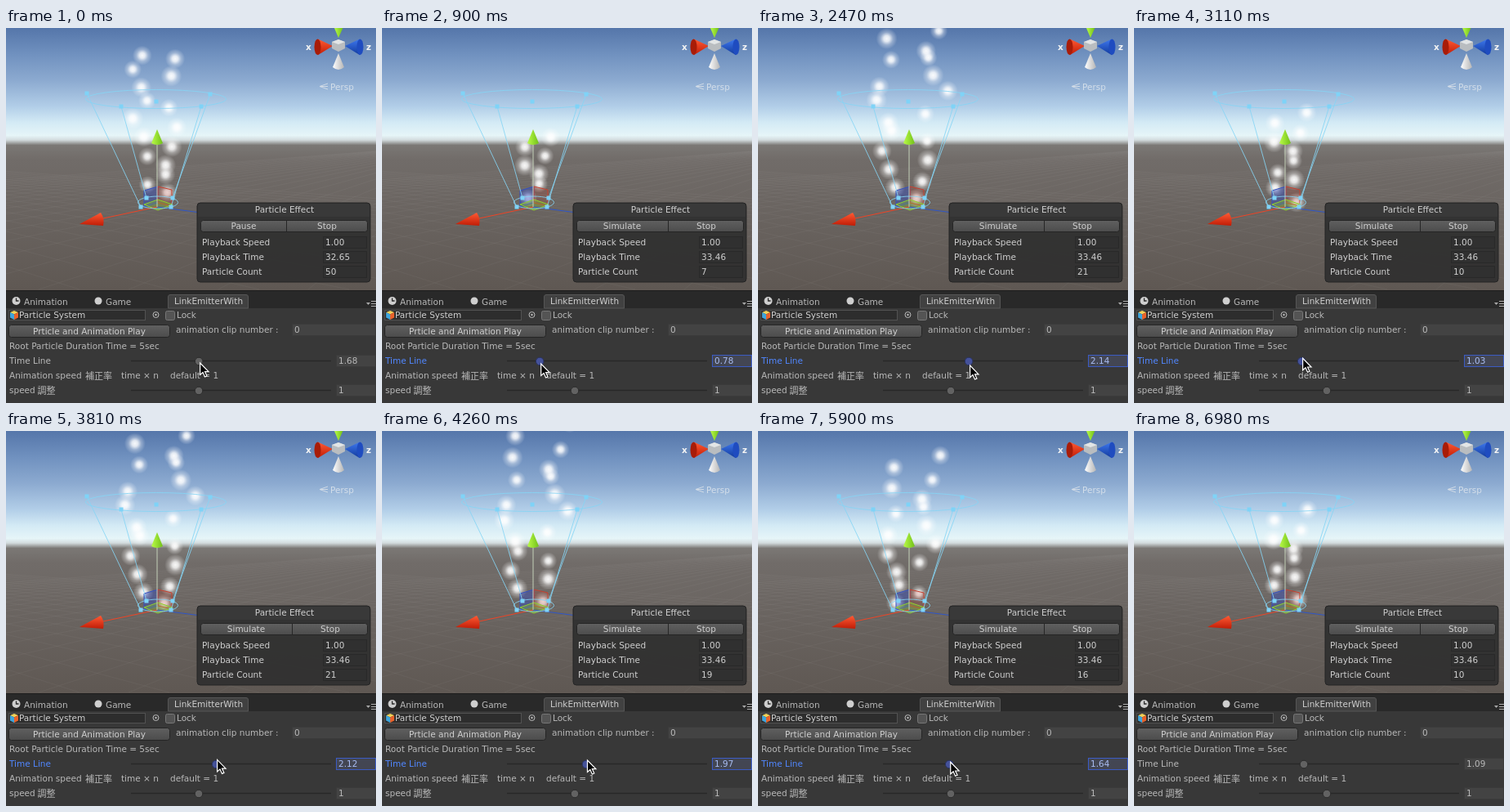
These frames come from a looping animation (453 by 459 pixels, 7080 ms). An HTML page:

```html
<!DOCTYPE html>
<html lang="en">
<head>
<meta charset="utf-8">
<title>Particle timeline</title>
<style>
html, body { margin: 0; width: 100%; height: 100%; overflow: hidden; background: #383838; }
svg { display: block; width: 100vw; height: 100vh; }
text { font: 10.5px "DejaVu Sans", "Noto Sans CJK JP", sans-serif; fill: #b9b9b9; white-space: pre; }
.mid { text-anchor: middle; }
.lit { fill: #cfcfcf; }
.cjk { font-family: "Noto Sans CJK JP", sans-serif; font-size: 11px; }
.axis { font-weight: bold; fill: #f4f4f4; }
.field { fill: #434343; stroke: #3b3b3b; }
.slot { fill: #2d2d2d; stroke: #525252; }
.stat { fill: #303030; stroke: #292929; }
.button { fill: url(#btn); stroke: #252525; }
.wire { fill: none; stroke: #86d5f5; stroke-width: .85; }
.groove { stroke: #282828; stroke-width: 1.5; }
.knob { fill: #626262; stroke: #2b2b2b; }
.on .label { fill: #5187ff; }
.on .knob { fill: #45529a; stroke: #28325e; }
.on .field { stroke: #3b5bc4; fill: #434653; }
.on .value { fill: #a9bdf2; }
</style>
</head>
<body>
<svg viewBox="0 0 453 459" preserveAspectRatio="none">
  <defs>
    <linearGradient id="sky" x2="0" y2="1">
      <stop offset="0" stop-color="#5576aa"/>
      <stop offset=".1" stop-color="#7091bf"/>
      <stop offset=".2" stop-color="#8caad0"/>
      <stop offset=".3" stop-color="#b2cee8"/>
      <stop offset=".36" stop-color="#d3eaf5"/>
      <stop offset=".41" stop-color="#e6f5f8"/>
      <stop offset=".427" stop-color="#d3dcde"/>
      <stop offset=".447" stop-color="#7b7875"/>
      <stop offset=".5" stop-color="#716c69"/>
      <stop offset="1" stop-color="#5f5853"/>
    </linearGradient>
    <linearGradient id="btn" x2="0" y2="1">
      <stop offset="0" stop-color="#606060"/><stop offset="1" stop-color="#4c4c4c"/>
    </linearGradient>
    <linearGradient id="red" x2="0" y2="1">
      <stop offset="0" stop-color="#ff5a34"/><stop offset="1" stop-color="#c01c06"/>
    </linearGradient>
    <linearGradient id="blue" x2="0" y2="1">
      <stop offset="0" stop-color="#3e78ee"/><stop offset="1" stop-color="#123a9c"/>
    </linearGradient>
    <linearGradient id="green">
      <stop offset="0" stop-color="#b9fb48"/><stop offset="1" stop-color="#72c01a"/>
    </linearGradient>
    <linearGradient id="grey">
      <stop offset="0" stop-color="#ffffff"/><stop offset="1" stop-color="#b5b5b5"/>
    </linearGradient>
    <radialGradient id="glow">
      <stop offset="0" stop-color="#fff" stop-opacity=".95"/>
      <stop offset=".28" stop-color="#fff" stop-opacity=".82"/>
      <stop offset=".6" stop-color="#fff" stop-opacity=".32"/>
      <stop offset="1" stop-color="#fff" stop-opacity="0"/>
    </radialGradient>
    <clipPath id="view"><rect width="453" height="321"/></clipPath>
  </defs>

  <g clip-path="url(#view)">
    <rect width="453" height="321" fill="url(#sky)"/>
    <path id="grid" stroke="#ddd" stroke-opacity=".045" fill="none"/>
    <g id="sparks" fill="url(#glow)"></g>

    <!-- move handles -->
    <path d="M169 199L186 194V214L169 219Z" fill="#2d49c8" fill-opacity=".4" stroke="#3450c0"/>
    <path d="M186 194L203 198V218L186 214Z" fill="#c03a2c" fill-opacity=".2" stroke="#c8402f"/>
    <path d="M169 216L186 210L204 216L186 223Z" fill="#8ac42a" fill-opacity=".3" stroke="#8fd22c"/>
    <path d="M185 219L119 233" stroke="#ee4426"/>
    <path d="M185 219L246 227" stroke="#2f56c8"/>
    <path d="M185 219V142" stroke="#c3d0b8"/>
    <path d="M90 240L116 226Q121 233 119 242Z" fill="url(#red)"/>
    <path d="M185 124L192 141Q185 145 178 141Z" fill="url(#green)"/>

    <!-- emitter cone -->
    <g class="wire" id="cone">
      <ellipse cx="183.5" cy="87" rx="86" ry="11.5"/>
      <ellipse cx="186" cy="213.5" rx="24.5" ry="7.5"/>
    </g>
    <g id="dots" fill="#7fd3f7"><rect x="181.500" y="87.500" width="5" height="5"/></g>

    <!-- orientation gizmo -->
    <path d="M402 0H412.500L407 12Z" fill="url(#green)"/>
    <path d="M400 22L382 13.500V33Z" fill="url(#red)"/>
    <ellipse cx="381.500" cy="23.200" rx="4" ry="9.800" fill="#a81c08"/>
    <path d="M415 22L433 13.500V33Z" fill="url(#blue)"/>
    <ellipse cx="433.500" cy="23.200" rx="4" ry="9.800" fill="#1f4cc0"/>
    <path d="M399 17L407 14L415 17V25L407 29L399 25Z" fill="#b9bdc0"/>
    <path d="M399 17L407 14L415 17L407 20Z" fill="#e2e5e6"/>
    <path d="M407 31L414 48Q407 54 400 48Z" fill="url(#grey)"/>
    <text class="axis" x="367" y="27">x</text>
    <text class="axis" x="441" y="27">z</text>
    <g opacity=".8">
      <path d="M394 68L384 71.500L394 75M384 71.500H394" fill="none" stroke="#dfe5ea"/>
      <text x="397" y="76" style="fill:#e3e9ef">Persp</text>
    </g>

    <!-- effect box -->
    <rect x="234" y="214" width="212" height="97" rx="4" fill="#303030" fill-opacity=".94" stroke="#252525"/>
    <path d="M235 231V218Q235 215 238 215H442Q445 215 445 218V231Z" fill="#393939"/>
    <text class="mid lit" x="341" y="226">Particle Effect</text>
    <rect class="button" x="238.500" y="235.500" width="204" height="14" rx="3"/>
    <path id="split" stroke="#262626"/>
    <text class="mid lit" id="mode" y="246"></text>
    <text class="mid lit" id="stop" y="246">Stop</text>
    <g id="stats"></g>
  </g>

  <!-- editor tabs -->
  <rect y="321" width="453" height="138" fill="#383838"/>
  <rect y="321" width="453" height="22" fill="#292929"/>
  <path d="M0 321.500H453" stroke="#1c1c1c"/>
  <path d="M198.500 343V329Q198.500 326.500 201 326.500H294Q296.500 326.500 296.500 329V343Z" fill="#414141" stroke="#565656"/>
  <circle cx="12.500" cy="334" r="5" fill="#cfcfcf"/>
  <path d="M12.500 330.500V334H15.500" fill="none" stroke="#292929" stroke-width="1.300"/>
  <circle cx="113" cy="334" r="4.500" fill="#cfcfcf"/>
  <text x="22" y="339">Animation</text>
  <text x="122" y="339">Game</text>
  <text class="mid lit" x="248" y="338">LinkEmitterWith</text>
  <path d="M441 336H446L443.500 339Z" fill="#aaa"/>
  <path d="M447 334.500H453M447 337.500H453M447 340.500H453" stroke="#aaa"/>

  <!-- inspector rows -->
  <rect class="slot" x="3.500" y="345.500" width="167" height="12"/>
  <path d="M5 348L10 346L15 348L10 350.500Z" fill="#f2d25a"/>
  <path d="M5 348L10 350.500V357L5 354.500Z" fill="#3fa5dc"/>
  <path d="M15 348L10 350.500V357L15 354.500Z" fill="#e8622b"/>
  <text class="lit" x="16" y="355">Particle System</text>
  <circle cx="183.500" cy="351" r="3.500" fill="none" stroke="#bbb"/>
  <circle cx="183.500" cy="351" r="1.200" fill="#bbb"/>
  <rect x="195.500" y="346.500" width="11" height="11" rx="2" fill="#545454" stroke="#777"/>
  <text x="209" y="355">Lock</text>
  <rect class="button" x="3.500" y="363.500" width="197" height="15" rx="3"/>
  <text class="mid lit" x="102" y="375">Prticle and Animation Play</text>
  <text x="208" y="373">animation clip number :</text>
  <rect class="field" x="350.500" y="362.500" width="102" height="14"/>
  <text x="353" y="373">0</text>
  <text x="4" y="393">Root Particle Duration Time = 5sec</text>

  <g id="timeline">
    <text class="label" x="4" y="411">Time Line</text>
    <path class="groove" d="M153 407.500H398"/>
    <circle class="knob" id="knob" cy="408" r="4.800"/>
    <rect class="field" x="404.500" y="400.500" width="48" height="14"/>
    <text class="value" id="value" x="407" y="411"></text>
  </g>

  <text x="4" y="429">Animation speed</text>
  <text class="cjk" x="97" y="429.500">補正率</text>
  <text x="141" y="429">time × n</text>
  <text x="201" y="429">default = 1</text>
  <text x="4" y="447">speed</text>
  <text class="cjk" x="38.500" y="447.500">調整</text>
  <path class="groove" d="M153 443.500H398"/>
  <circle class="knob" cx="236" cy="444" r="4.800"/>
  <rect class="field" x="404.500" y="436.500" width="48" height="14"/>
  <text x="407" y="447">1</text>

  <path id="cursor" d="M0 0V14.500L3.400 11.500L5.900 17L8.300 16L5.900 10.700H10.400Z" fill="#000" stroke="#fff" stroke-width="1.200"/>
</svg>

<script>
const LOOP = 7080, GRAB = 200, RELEASE = 6980, STEP = 58;
const START = { value: 1.68, y: 410 };
const LEAVE = { from: 6250, to: 6720, dx: 194, dy: 57 };

// Slider drags: each bends from the last value past `via` to `value`
const drags = [
  { from: GRAB, to: 900, via: 1.23, value: .78, y: 411 },
  { from: 1020, to: 1720, via: 2.27, value: 3.75, y: 419 },
  { from: 1840, to: 2530, via: 2.65, value: 1.9, y: 412 },
  { from: 2590, to: 3270, via: 1.03, value: .95, y: 402 },
  { from: 3570, to: 4260, via: 3.1, value: 1.97, y: 403 },
  { from: 4320, to: 4840, via: 1.2, value: .65, y: 403 },
  { from: 5330, to: 6020, via: 2.7, value: 1.09, y: 406 }
];

const $ = id => document.getElementById(id);
const mix = (a, b, f) => a + (b - a) * f;

function add(parent, tag, attrs, text = "") {
  const el = document.createElementNS("http://www.w3.org/2000/svg", tag);
  for (const name in attrs) el.setAttribute(name, attrs[name]);
  el.textContent = text;
  return parent.appendChild(el);
}

function random(n) {
  const s = Math.sin(n * 12.9898) * 43758.5453;
  return s - Math.floor(s);
}

// Part of a move done at time t, in whole screen updates
function progress({ from, to }, t) {
  if (t < from) return 0;
  const n = Math.round((to - from) / STEP) + 1;
  const step = (to - from) / (n - 1);
  return Math.min(n, Math.floor((t - from) / step + .001) + 1) / n;
}

function slider(t) {
  let { value, y } = START;
  for (const d of drags) {
    const f = progress(d, t);
    value = mix(mix(value, d.via, f), mix(d.via, d.value, f), f);
    y = mix(y, d.y, f);
  }
  return { value: Math.round(value * 100) / 100, y };
}

// Sparks leave on alternating sides and spread along the cone as they rise
function sparkAt(n, age) {
  const swing = Math.cbrt(Math.cos(Math.PI * 7 / 8 * (n - 5.5)));
  const reach = (.25 + .015 * (n % 36)) * (.6 + .8 * random(n));
  const depth = 2 * random(n + .5) - 1;
  return [185 + swing * reach * (24 + 55 * age), 214 + 5 * depth - age * (118 + 8 * depth)];
}

const sparks = Array.from({ length: 40 }, (_, i) =>
  add($("sparks"), "circle", { r: 10.5 + 3 * random(i + .25) }));

// Cone edges, each from the top rim to the base
for (const [x1, y1, x2, y2] of [[99, 80, 165, 219], [141, 96, 172, 208],
  [239, 96, 202, 219], [250, 81, 204, 208]]) {
  add($("cone"), "line", { x1, y1, x2, y2 });
  for (const [x, y] of [[x1, y1], [x2, y2]])
    add($("dots"), "rect", { x: x - 2.5, y: y - 2.5, width: 5, height: 5 });
}

const stats = ["Playback Speed", "Playback Time", "Particle Count"].map((name, i) => {
  const y = 266 + i * 18;
  add($("stats"), "text", { x: 240, y, class: "lit" }, name);
  add($("stats"), "rect", { x: 388.5, y: y - 10.5, width: 53, height: 14, class: "stat" });
  return add($("stats"), "text", { x: 391, y, class: "lit" });
});

let grid = "";
for (let i = -10; i < 14; i++)
  grid += `M590 140L${-290 - 110 * i} 320M-476 140L${530 + 110 * i} 320`;
$("grid").setAttribute("d", grid);

function draw(t) {
  const { value, y } = slider(t);
  const held = t >= GRAB;
  const knobX = 156 + 47.7 * value;

  // Free playback shows a later batch of sparks
  const batch = held ? 1 : 73;
  sparks.forEach((el, i) => {
    const age = value - (i + 1) / 10;
    el.setAttribute("visibility", age >= 0 ? "visible" : "hidden");
    const [cx, cy] = sparkAt(i + batch, age);
    el.setAttribute("cx", cx);
    el.setAttribute("cy", cy);
  });

  $("mode").textContent = held ? "Simulate" : "Pause";
  $("mode").setAttribute("x", held ? 294 : 291);
  $("stop").setAttribute("x", held ? 397 : 393);
  $("split").setAttribute("d", `M${held ? 350.5 : 343.5} 236V249`);
  const count = held ? Math.floor(value * 10 + .001) : 50;
  ["1.00", held ? "33.46" : "32.65", count].forEach((s, i) => stats[i].textContent = s);

  $("timeline").setAttribute("class", held && t < RELEASE ? "on" : "");
  $("knob").setAttribute("cx", knobX);
  $("value").textContent = value.toFixed(2);

  const away = progress(LEAVE, t);
  $("cursor").setAttribute("transform",
    `translate(${knobX + 1.5 + LEAVE.dx * away} ${y + LEAVE.dy * away})`);
}

const begin = performance.now();
function tick() {
  draw((performance.now() - begin) % LOOP);
  requestAnimationFrame(tick);
}
tick();
</script>
</body>
</html>
```
